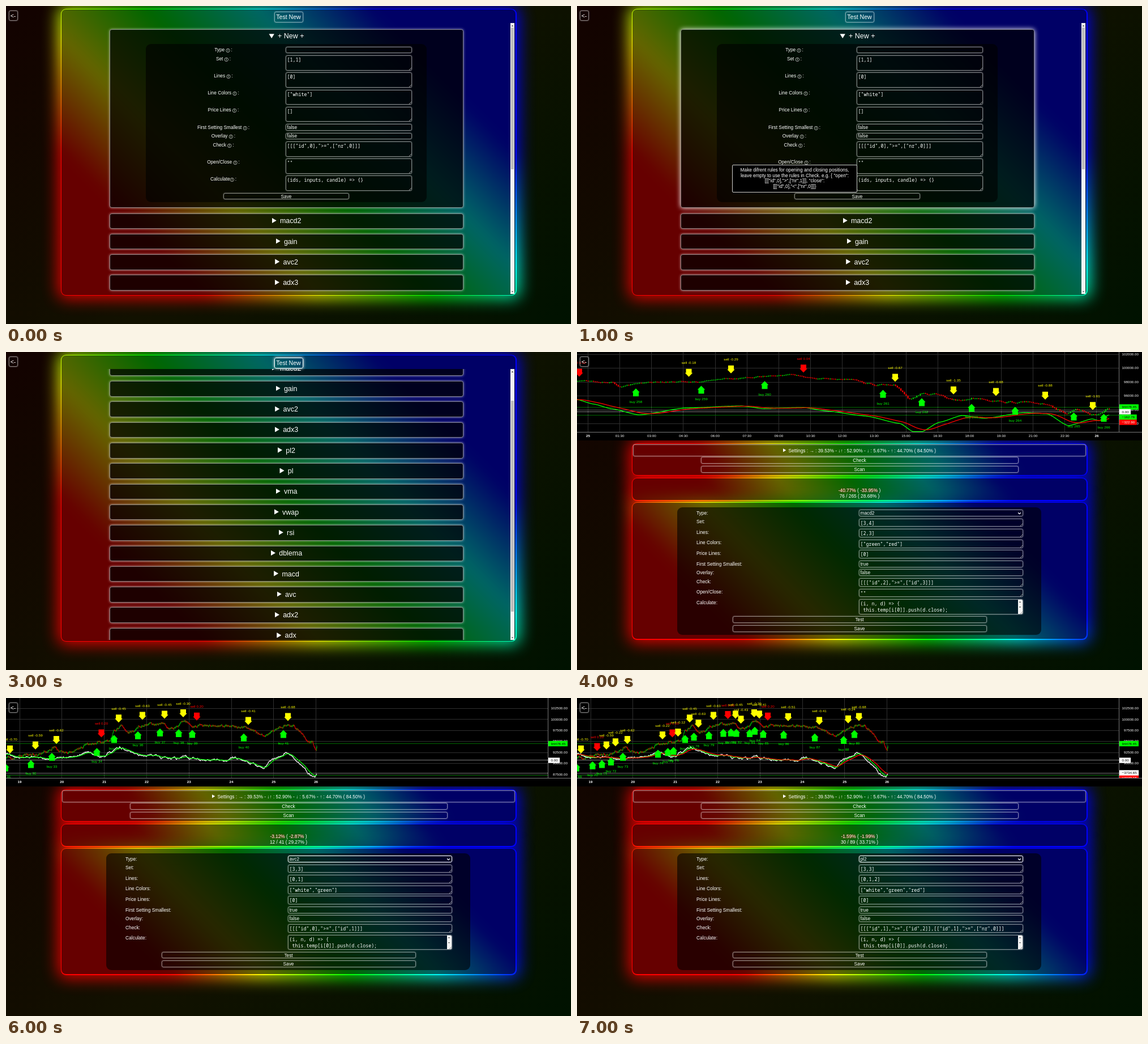
An HTML page with a canvas that plays this animation: 998 by 561 pixels, repeating every 8000 ms.

```html
<!DOCTYPE html>
<html lang="en">
<head>
<meta charset="utf-8">
<title>Indicator editor</title>
<style>
html, body { margin: 0; width: 100%; height: 100%; overflow: hidden; background: #000; }
#stage { position: relative; width: 998px; height: 561px; overflow: hidden; color: #fff;
  font: 8.32px "Liberation Sans", Arial, sans-serif;
  background: linear-gradient(135deg, #130200, #121100 50%, #001200); }
#stage div { position: absolute; box-sizing: border-box; white-space: pre; }
#stage .scene { inset: 0; display: none; }
#stage .scene.on { display: block; }
.panel { isolation: isolate; border-radius: 9px;
  background: linear-gradient(45deg, #f00 20%, #ff0 35%, #0f0 50%, #0ff 65%, #00f 80%); }
.panel::before { content: ""; position: absolute; inset: -5px; z-index: -1;
  border-radius: 12px; background: inherit; filter: blur(14px); opacity: .85; }
.shade { border-radius: 8px; background: rgba(0,0,0,.6); }
.mid { display: flex; align-items: center; justify-content: center; text-align: center; }
.left { display: flex; align-items: center; }
.dark { border-radius: 9px; background: rgba(0,0,0,.6); }
.clip { overflow: hidden; }
.row, .field, .btn { border: 1px solid rgba(255,255,255,.5); border-radius: 3px;
  box-shadow: 0 0 2px rgba(255,255,255,.55); }
.row { border-radius: 4px; background: rgba(0,0,0,.7); box-shadow: 0 0 4px rgba(255,255,255,.6); }
.title { font-size: 12.48px; }
.field { padding-left: 1.5px; overflow: hidden; }
.t, .c { padding-top: 1px; font: 8.32px/11.3px "Noto Sans Mono", monospace; }
.t::after, .c::after { content: ""; position: absolute; right: 0; bottom: 0; width: 4px; height: 4px;
  background: linear-gradient(135deg, transparent 50%, #999 50% 62%, transparent 62% 78%, #999 78%); }
.big { font-size: 10.6px; }
.row.hot { box-shadow: 0 0 8px #fff; }
.btn.hot { box-shadow: 0 0 5px #fff; border-color: #fff; }
.field.hot { border-color: #fff; }
.tip { background: #000; border: 1px solid #ccc; border-radius: 2px; line-height: 9.4px; }
.info { font-size: 6.6px; font-weight: bold; }
.tri { display: inline-block; width: .65em; height: .76em; margin-right: .5em; background: #fff;
  clip-path: polygon(0 0, 100% 50%, 0 100%); }
.tri.down { width: .75em; height: .62em; clip-path: polygon(0 0, 100% 0, 50% 100%); }
.track { background: #f4f4f4; }
.thumb { background: #bbb; }
.arrow { background: #555; clip-path: polygon(50% 0, 100% 100%, 0 100%); }
.arrow.dn { clip-path: polygon(0 0, 100% 0, 50% 100%); }
.chevron { background: #fff; clip-path: polygon(0 0, 50% 55%, 100% 0, 100% 40%, 50% 100%, 0 40%); }
canvas { position: absolute; left: 0; top: 0; }
</style>
</head>
<body>
<div id="stage"></div>
<script>
const stage = document.getElementById('stage');
const HEIGHT = { s: 11.8, t: 14.9, c: 26.5 }, GAP = 3.7;

const box = (x, y, w, h, cls, html = '') =>
  `<div class="${cls}" style="left:${x}px;top:${y}px;width:${w}px;height:${h}px">${html}</div>`;
const mid = (x, y, w, h, cls, html) => box(x, y, w, h, 'mid ' + cls, `<span>${html}</span>`);
const tri = (down = '') => `<span class="tri ${down}"></span>`;
const back = mid(4.5, 7.5, 16, 18, 'btn big', '&lt;-');

// Every glow lies above the earlier panels, every shade above all glows
const panels = list => list.map(([y, h]) => box(96.5, y, 805, h, 'panel')).join('') +
  list.map(([y, h]) => box(98, y + 1.5, 802, h - 3, 'shade')).join('');

function form(rows, y, x, w, label, [bx, bw, names]) {
  let html = '';
  for (const [kind, name, value, hot = ''] of rows) {
    const h = HEIGHT[kind], line = kind === 's' ? 'left' : '';
    let extra = '';
    if (name === 'Type:') extra = box(w - 9.5, 3.6, 5, 4, 'chevron');
    if (/\n|"close"/.test(value)) extra = box(w - 10, 0, 8, h - 2, 'track',
      box(2, 3, 4, 2, 'arrow') + box(2, h / 2 - 1, 4, 2, 'arrow dn'));
    html += label(name, y - .4) + box(x, y, w, h, `field ${line} ${kind} ${hot}`, value + extra);
    y += h + GAP;
  }
  for (const name of names) {
    html += mid(bx, y, bw, HEIGHT.s, 'btn', name);
    y += HEIGHT.s + GAP;
  }
  return html;
}

// List of indicators
const NAMES = 'macd2 gain avc2 adx3 pl2 pl vma vwap rsi dblema macd avc adx2 adx'.split(' ');
const newRows = [['s', 'Type ', ''], ['c', 'Set ', '[1,1]'], ['c', 'Lines ', '[0]'],
  ['c', 'Line Colors ', '["white"]'], ['c', 'Price Lines ', '[]'], ['s', 'First Setting Smallest ', 'false'],
  ['s', 'Overlay ', 'false'], ['c', 'Check ', '[[["id",0],">=",["nr",0]]]'], ['c', 'Open/Close ', '""'],
  ['c', 'Calculate', '(ids, inputs, candle) => {}']];
const infoLabel = (name, y) => mid(284, y, 200, 12, '', name + '<span class="info">ⓘ</span> :');
const tipText = 'Make difrent rules for opening and closing positions,<br>' +
  'leave empty to use the rules in Check. e.g. { "open":<br>' +
  '[[["id",0],"&gt;",["nr",1]]], "close":<br>[[["id",0],"&lt;",["nr",0]]]}';

function listScene({ open, scroll = 0, hotNew = '', hotTest = '', tip }) {
  const newHeight = open ? 315 : 27;
  let rows = box(183, 41, 625, newHeight, 'row ' + hotNew) +
    mid(183, 41, 625, open ? 24 : 27, 'title', tri(open && 'down') + '+ New +');
  if (open) rows += box(247, 67, 496, 279, 'dark') +
    form(newRows, 71.7, 494, 223, infoLabel, [384, 222, ['Save']]);
  NAMES.forEach((name, i) =>
    rows += mid(183, 50.5 + newHeight + i * 36.3, 625, 27.5, 'row title', tri() + name));
  if (tip) rows += mid(274, 280, 221, 48.5, 'tip', tipText);
  return { html: back + panels([[4.5, 506.5]]) +
    box(97, 30, 794, 478, 'clip', box(-97, -30 - scroll, 998, 800, '', rows)) +
    box(891, 30, 7, 478, 'track') +
    box(891.7, 38 + scroll * .77, 5.6, open ? 250 : 372, 'thumb') +
    box(892.5, 33.5, 4, 2.5, 'arrow') + box(892.5, 502.5, 4, 2.5, 'arrow dn') +
    mid(473.5, 9.5, 51, 19, 'btn big ' + hotTest, 'Test New') };
}

// Test page
const KIND = { Type: 's', 'First Setting Smallest': 's', Overlay: 's', Calculate: 'c' };
const BASE = ['Type', 'Set', 'Lines', 'Line Colors', 'Price Lines', 'First Setting Smallest', 'Overlay', 'Check'];
const CODE = '(i, n, d) => {\n this.temp[i[0]].push(d.close);';
const plainLabel = (name, y) => box(211, y, 200, 12, 'left', name);

function testScene(values, [gain, gain2, wins], lastNames, chart, hot = 'hot') {
  const rows = [...BASE, ...lastNames].map((name, i) =>
    [KIND[name] || 't', name + ':', values[i], i ? '' : hot]);
  const less = (2 - lastNames.length) * 18.6;
  const glow = gain[0] === '-' ? 'red' : 'lime';
  const num = s => `<span style="text-shadow:0 0 3px ${glow}">${s}</span>`;
  const html = panels([[160.5, 57.5], [221.5, 41], [264.5, 243 - less]]) +
    mid(99, 163, 800, 21, 'btn', tri() +
      'Settings : → : 39.53% - ↓↑ : 52.90% - ↓ : 5.67% - ↑ : 44.70% ( 84.50% )') +
    mid(218.5, 185.3, 561, HEIGHT.s, 'btn', 'Check') + mid(218.5, 200.8, 561, HEIGHT.s, 'btn', 'Scan') +
    mid(299, 238, 400, 11, '', `${num(gain)} ( ${num(gain2)} )`) + mid(299, 248, 400, 11, '', wins) +
    box(177, 274, 643, 224.5 - less, 'dark') +
    form(rows, 278, 498, 289.5, plainLabel, [274.5, 449, ['Test', 'Save']]) +
    '<canvas width="998" height="156"></canvas>' + back;
  return { html, chart };
}

// Chart drawing: key points "x,y x,y" give the course, a seeded walk the detail
const points = s => s.split(' ').map(p => p.split(',').map(Number));
function at(path, x) {
  let i = 1;
  while (i < path.length - 1 && path[i][0] < x) i++;
  const [x0, y0] = path[i - 1], [x1, y1] = path[i];
  const k = Math.min(1, Math.max(0, (x - x0) / (x1 - x0)));
  return y0 + (y1 - y0) * (k + k * k * (3 - 2 * k)) / 2;
}
const random = seed => () => (seed = seed * 16807 % 2147483647) / 2147483647 - .5;
function walk(seed, size) {
  const rnd = random(seed);
  let n = 0;
  return () => n = n * .85 + rnd() * size;
}

function drawChart(c, o) {
  const rect = (color, x, y, w, h) => { c.fillStyle = color; c.fillRect(x, y, w, h); };
  const text = (s, x, y, color, align = 'center') => {
    c.fillStyle = color; c.textAlign = align; c.fillText(s, x, y);
  };
  const font = weight => c.font = weight + ' 6.24px "Liberation Sans", Arial, sans-serif';
  font('normal');
  c.textBaseline = 'middle';
  rect('#000', 0, 0, 998, 156);
  const [tx, dx, times] = o.time, [value, dv, py, dy] = o.scale;
  times.forEach((_, i) => rect('#2f2f2f', Math.floor(tx + i * dx), 0, 1, 141));
  for (let y = py; y < 141; y += dy) rect('#2f2f2f', 0, Math.floor(y), 957, 1);
  for (const [color, y] of o.dots) for (let x = 0; x < 957; x += 2) rect(color, x, y, 1, 1);

  const noise = walk(77, 3), wick = random(5), fine = o.step < 2;
  let open = at(o.price, 0);
  for (let x = 0; x <= o.end; x += o.step) {
    const close = at(o.price, x) + noise() * (fine || x > 500 ? 1 : .5);
    const color = close < open ? '#00d000' : '#f00000';
    const top = Math.min(open, close), h = Math.abs(open - close);
    rect(color, x + (fine ? 0 : .8), top - 1, .7, h + 2 + wick());
    if (!fine) rect(color, x, top, 2.3, Math.max(1, h));
    open = close;
  }
  for (const [color, path, size, follow] of o.lines) {
    const jitter = walk(31, size);
    let y = at(path, 0);
    c.beginPath();
    for (let x = 0; x <= o.end; x += .8) {
      y += (at(path, x) + jitter() - y) * follow;
      c.lineTo(x, Math.min(y, 140.5));
    }
    c.strokeStyle = color; c.lineWidth = 1.3; c.stroke();
  }
  const marker = (x, dir, color, label) => {
    const y = at(o.price, x) - dir * 15.5;
    c.fillStyle = color;
    c.beginPath();
    for (const [a, b] of [[-5, -7], [5, -7], [5, 0], [6.8, 0], [0, 7], [-6.8, 0], [-5, 0]])
      c.lineTo(x + a, y + b * dir);
    c.fill();
    text(label, x, y - dir * 17.2, color);
  };
  for (const [x, gain] of o.sells) marker(x, 1, gain < 0 ? '#ff0' : '#f00', 'sell ' + gain.toFixed(2));
  o.buys.forEach((x, i) => marker(x, -1, '#0f0', 'buy ' + (o.firstBuy + i)));

  rect('#000', 957, 0, 41, 156);
  rect('#000', 0, 141, 998, 15);
  for (let i = 0; py + i * dy < 137; i++)
    text((value - i * dv).toFixed(2), 992, py + i * dy, '#fff', 'right');
  for (const [s, y, color] of o.tags) {
    rect(color, 957, y - 4.7, c.measureText(s).width + 9, 9.4);
    text(s, 962.5, y + .3, color === '#f00' ? '#fff' : '#000', 'left');
  }
  rect('#000', 957, 142, 41, 14);
  rect('#777', 957, 0, 1, 142);
  rect('#777', 0, 141, 998, 1);
  times.forEach((s, i) => {
    font(s.length < 3 ? 'bold' : 'normal');
    text(s, tx + i * dx, 148.5, '#fff');
  });
}

const hours = Array.from({ length: 17 }, (_, i) => i === 0 ? '25' : i === 16 ? '26' :
  String(Math.floor(i * 1.5)).padStart(2, '0') + (i % 2 ? ':30' : ':00'));
const macd = points('0,84 30,92 60,100 110,111 190,99 290,95 330,100 400,98 440,104 510,113 570,126 ' +
  '595,141 608,141 640,124 680,112 720,117 790,107 830,109 868,130 910,118 922,121 940,111');
const PRICE_TAG = '94478.45';
const intraday = {
  time: [19.5, 56.15, hours], scale: [102000, 2000, 4, 24.5], step: 3.12, end: 940,
  price: points('0,52 60,53 75,62 110,55 210,52 250,47 370,41 420,47 485,48 510,54 562,61 588,84 608,73 ' +
    '685,86 702,82 740,86 825,92 865,108 880,97 912,111 938,97'),
  lines: [['#0f0', macd, 0, 1], ['#f00', macd, 0, .04]],
  dots: [['#0c0', 97], ['#888', 102], ['#fff', 105], ['#0c0', 111]],
  tags: [[PRICE_TAG, 97, '#0f0'], ['0.00', 105.5, '#fff'], ['−162.76', 115, '#0f0'], ['−322.90', 124, '#f00']],
  sells: [[4, .12], [197.5, -.18], [272, -.29], [400, .04], [562, -.67], [665, -1.35], [740, -.68],
    [827, -.88], [911, -1.61]],
  buys: [104, 219.5, 331.5, 540.5, 609, 697, 774, 877.5, 930.5], firstBuy: 258
};
const week = {
  time: [24, 74.8, [19, 20, 21, 22, 23, 24, 25, 26].map(String)], scale: [102500, 2500, 18.5, 19.4],
  step: .8, end: 549.5,
  price: points('0,107 45,101 75,92 85,86 97,98 110,97 140,83 183,76 190,57 203,50 215,61 240,47 280,45 290,54 ' +
    '315,42 330,48 400,50 435,57 455,67 490,48 505,50 541,78 547,92 550,80')
};
const gainLine = points('0,115 15,121 45,110 85,101 100,118 120,113 150,106 184,108 190,90 210,87 245,95 ' +
  '262,91 290,114 315,107 330,116 400,123 455,131 475,124 505,123 520,136 545,140 549,130');
const gainChart = { ...week,
  lines: [['#fff', gainLine, 3, .8]],
  dots: [['#0c0', 80], ['#ccc', 115], ['#ccc', 120], ['#fff', 125], ['#ccc', 130]],
  tags: [[PRICE_TAG, 80.5, '#0f0'], ['1.00', 115.5, '#fff'], ['−1.00', 133.5, '#fff'], ['0.00', 124.6, '#fff']],
  sells: [[7, -1.52], [67.5, -.75], [95, -.87], [330, 6.2]],
  buys: [-2, 12, 77, 98], firstBuy: 17
};

// Each trade is bought shortly before it is sold
const luck = random(9);
const sales = [7, 35.5, 52, 68, 89, 151, 168.5, 178.5, 199, 214.5, 241, 266.5, 280, 289.5, 313, 322, 337, 373,
  428, 479, 498];
const trades = sales.map((x, i) => [x, i % 5 === 1 ? .2 : -.4 + luck() * .6]);
const trend = points('0,100 20,105 110,106 140,97 165,102 185,97 192,87 210,89 225,99 285,105 385,110 400,106 ' +
  '455,123 475,105 495,97 510,107 545,140 549,132');
const trendChart = { ...week,
  lines: [['#fff', trend, 3, .8], ['#0f0', trend, 2, .15], ['#f00', trend, 2, .07]],
  dots: [['#0c0', 80], ['#fff', 109], ['#ccc', 132], ['#0c0', 136]],
  tags: [[PRICE_TAG, 80.5, '#0f0'], ['0.00', 110, '#fff'], ['−4449.16', 140.5, '#f00'], ['−3734.65', 132, '#fff']],
  sells: trades, buys: sales.map(x => x - 8), firstBuy: 69
};
const half = (_, i) => i % 2 === 0;
const averageChart = { ...trendChart, lines: trendChart.lines.slice(0, 2), tags: trendChart.tags.slice(0, 2),
  sells: trades.filter(half), buys: trendChart.buys.filter(half), firstBuy: 31 };

const scenes = [
  listScene({ open: true }),
  listScene({ open: true, hotNew: 'hot', tip: true }),
  listScene({ hotNew: 'hot' }),
  listScene({ scroll: 62.7, hotTest: 'hot' }),
  testScene(['macd2', '[3,4]', '[2,3]', '["green","red"]', '[0]', 'true', 'false', '[[["id",2],">=",["id",3]]]',
    '""', CODE], ['-40.77%', '-33.95%', '76 / 265 ( 28.68% )'], ['Open/Close', 'Calculate'], intraday, ''),
  testScene(['gain', '[1,1]', '[0]', '["white"]', '[1,-1,0]', 'false', 'false', '[[["id",0],">=",["nr",0]]]',
    CODE, '{"open":[[["id",0],">=",["nr",1]]],"close":[[["id",0],"'],
    ['18.94%', '18.93%', '6 / 20 ( 30.00% )'], ['Calculate', 'Open/Close'], gainChart),
  testScene(['avc2', '[3,3]', '[0,1]', '["white","green"]', '[0]', 'true', 'false', '[[["id",0],">=",["id",1]]]',
    CODE], ['-3.12%', '-2.87%', '12 / 41 ( 29.27% )'], ['Calculate'], averageChart),
  testScene(['pl2', '[3,3]', '[0,1,2]', '["white","green","red"]', '[0]', 'true', 'false',
    '[[["id",1],">=",["id",2]],[["id",1],">=",["nr",0]]]', CODE],
    ['-1.59%', '-1.99%', '30 / 89 ( 33.71% )'], ['Calculate'], trendChart)
];
stage.innerHTML = scenes.map(s => `<div class="scene">${s.html}</div>`).join('');
const views = [...stage.children];
views.forEach((view, i) => {
  const canvas = view.querySelector('canvas');
  if (canvas) drawChart(canvas.getContext('2d'), scenes[i].chart);
});

function tick() {
  const now = Math.floor(performance.now() / 1000) % scenes.length;
  views.forEach((view, i) => view.classList.toggle('on', i === now));
  requestAnimationFrame(tick);
}
tick();
</script>
</body>
</html>
```
